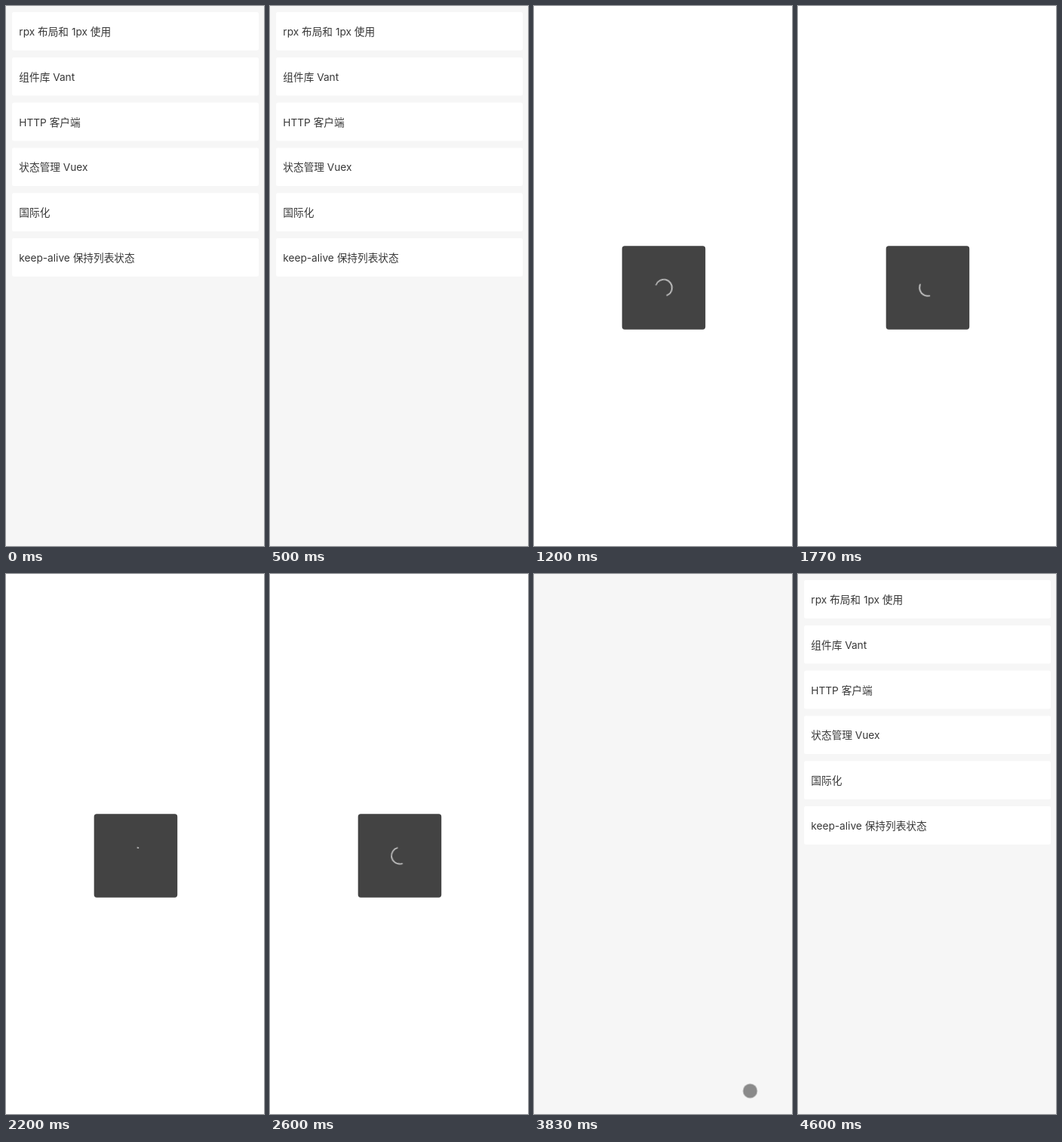
Animation, 342 px wide and 714 px high, one loop 4.81 s. Source, as an HTML page:

```html
<!DOCTYPE html>
<html lang="zh-CN">
<head>
<meta charset="utf-8">
<title>Loading toast</title>
<style>
  html, body { margin: 0; width: 100%; height: 100%; overflow: hidden; background: #f6f6f6; }
  svg { display: block; width: 342px; height: 714px; }
  text { font: 13.68px Inter, "Noto Sans CJK SC", "Noto Sans CJK", sans-serif; fill: #383838; }
  .card { fill: #fff; }

  .list, .loading, .touch { animation: 4810ms step-end infinite; }
  .list { animation-name: list; }
  .loading { animation-name: loading; }
  .touch { animation-name: touch; fill: #8a8a8a; stroke: #fff; stroke-width: 1.5; paint-order: stroke; }

  .spin { animation: spin 4810ms linear infinite; }
  .arc {
    fill: none; stroke: #c9c9c9; stroke-width: 3; stroke-linecap: round;
    animation: arc 4810ms ease-in-out infinite;
  }

  @keyframes list {
    0%, 85.23% { visibility: visible; }
    13.92% { visibility: hidden; }
  }
  @keyframes loading {
    0%, 67.15% { visibility: hidden; }
    13.92% { visibility: visible; }
  }
  @keyframes touch {
    0%, 81.08% { visibility: hidden; transform: translate(286.5px, 683.5px); }
    79.62% { visibility: visible; transform: translate(286.5px, 683.5px); }
    80.45% { visibility: visible; transform: translate(335px, 631px); }
  }
  /* One turn takes 2 s */
  @keyframes spin {
    0%, 13.92% { transform: rotate(5.4deg); }
    67.15%, 100% { transform: rotate(466.2deg); }
  }
  /* One stretch takes 1.5 s; the second stops half way */
  @keyframes arc {
    0%, 13.306%, 44.492% { stroke-dasharray: 1, 200; stroke-dashoffset: 0; }
    28.898% { stroke-dasharray: 90, 150; stroke-dashoffset: -40; }
    44.491% { stroke-dasharray: 90, 150; stroke-dashoffset: -120; }
    60.083%, 100% { stroke-dasharray: 90, 150; stroke-dashoffset: -40; }
  }
</style>
</head>
<body>
<svg viewBox="0 0 342 714">
  <defs>
    <rect id="card" class="card" x="8" y="8.1" width="327" height="50.6" rx="2.5"/>
  </defs>
  <g class="list">
    <g><use href="#card"/><text x="17.3" y="39">rpx 布局和 1px 使用</text></g>
    <g transform="translate(0 59.8)"><use href="#card"/><text x="17.3" y="39">组件库 Vant</text></g>
    <g transform="translate(0 119.6)"><use href="#card"/><text x="17.3" y="39">HTTP 客户端</text></g>
    <g transform="translate(0 179.4)"><use href="#card"/><text x="17.3" y="39">状态管理 Vuex</text></g>
    <g transform="translate(0 239.2)"><use href="#card"/><text x="17.3" y="39">国际化</text></g>
    <g transform="translate(0 299)"><use href="#card"/><text x="17.3" y="39">keep-alive 保持列表状态</text></g>
  </g>
  <g class="loading">
    <rect width="342" height="714" fill="#fff"/>
    <rect x="116.7" y="317.3" width="110.5" height="110.4" rx="3.6" fill="#434343"/>
    <g transform="translate(172 372.5) scale(.547)">
      <g class="spin"><circle class="arc" r="20"/></g>
    </g>
  </g>
  <circle class="touch" r="9.5"/>
</svg>
</body>
</html>
```
